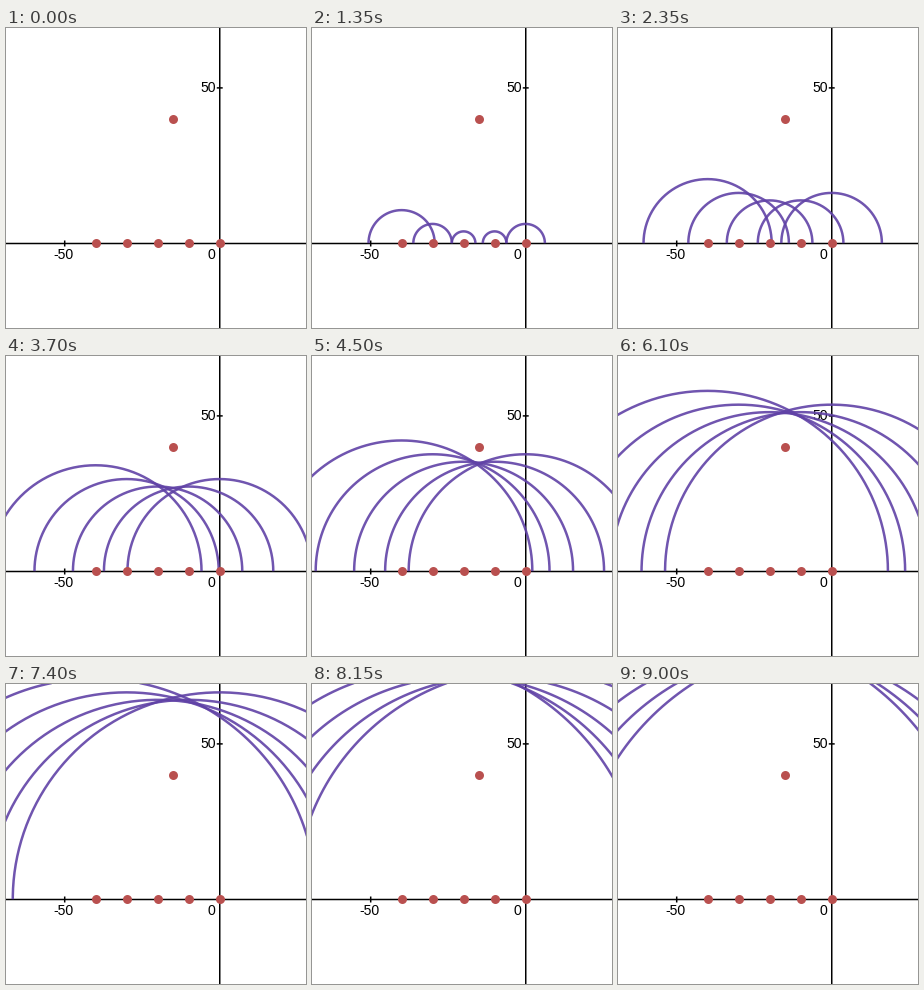
Recreate the animation shown at these times as a matplotlib script. Size 300 by 300 pixels, loop 9050 ms.

```python
import numpy as np
import matplotlib.pyplot as plt
from matplotlib.animation import FuncAnimation

STEP_MS = 50
FRAMES = 181
SCALE = 3.1                # pixels per graph unit
OX, OY = 213.6, 215.2      # graph origin in pixels
PX = 0.72                  # points per pixel at 100 dpi
PURPLE, RED = "#6042a6", "#b9504f"

EMITTER = (-15, 40)
CENTERS = np.array([-40, -30, -20, -10, 0])
DISTANCES = np.hypot(CENTERS - EMITTER[0], EMITTER[1])
ANGLES = np.linspace(0, np.pi, 241)


def to_px(x, y):
    return OX + SCALE * x, OY - SCALE * y


def stroke(xs, ys, width, color, **kw):
    return ax.plot(xs, ys, color=color, lw=width * PX,
                   solid_capstyle="butt", **kw)[0]


plt.rcParams["font.family"] = "Liberation Sans"
fig = plt.figure(figsize=(3, 3), dpi=100, facecolor="white")
ax = fig.add_axes([0, 0, 1, 1])
ax.set_xlim(0, 300)
ax.set_ylim(300, 0)
ax.axis("off")

# Axes, ticks and labels
axis_x, axis_y = 213.75, 215.5
for xs, ys in [((0, 300), (axis_y, axis_y)),
               ((axis_x, axis_x), (0, 300)),
               ((58.7, 58.7), (212.5, 218.5)),
               ((210.8, 216.7), (59.9, 59.9))]:
    stroke(xs, ys, 1.5, "black", snap=False, zorder=1)

for text, x, y in [("-50", 67.3, 231), ("0", 209.6, 231), ("50", 209.6, 64)]:
    ax.text(x, y, text, size=14 * PX, color="black",
            ha="right", va="baseline", zorder=1)

# Semicircular wavelets
arcs = [stroke([], [], 2.5, PURPLE, alpha=0.9, zorder=2) for _ in CENTERS]

# Points
dot_x, dot_y = to_px(np.append(CENTERS, EMITTER[0]),
                     np.append(np.zeros(len(CENTERS)), EMITTER[1]))
ax.plot(dot_x, dot_y, "o", color=RED, ms=9 * PX, mew=0, zorder=3)


def update(frame):
    shift = 0.5 * frame - 50
    for arc, center, distance in zip(arcs, CENTERS, DISTANCES):
        r = distance + shift
        arc.set_visible(r > 0)
        arc.set_data(*to_px(center + r * np.cos(ANGLES), r * np.sin(ANGLES)))
    return arcs


anim = FuncAnimation(fig, update, frames=FRAMES, interval=STEP_MS,
                     repeat=True, repeat_delay=0, blit=False)
plt.show()
```
